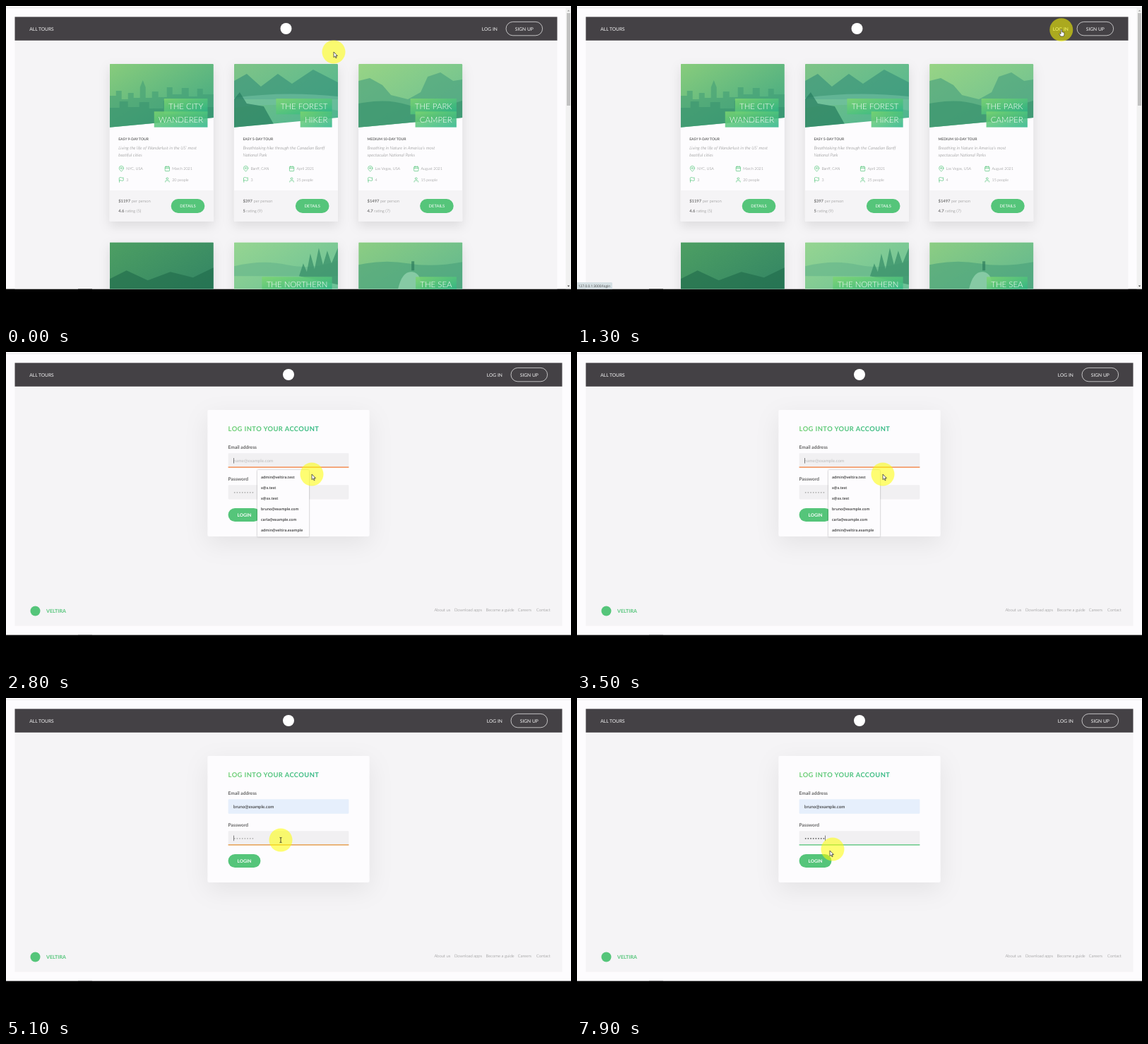
Animation of 800x450 px, one loop 8 s. Source, as an HTML page:

```html
<!DOCTYPE html>
<html lang="en">
<head>
<meta charset="utf-8">
<title>Tour login</title>
<style>
html, body { margin: 0; width: 100%; height: 100%; overflow: hidden; background: #000; }
svg { display: block; width: 800px; height: 450px; font-family: Lato, sans-serif; text-rendering: geometricPrecision; }
text { white-space: pre; }
.card { filter: drop-shadow(0 6px 8px rgba(0,0,0,.1)); }
.form { filter: drop-shadow(0 10px 17px rgba(0,0,0,.07)); }
.menu { filter: drop-shadow(0 .5px 1px rgba(0,0,0,.35)); }
.icon { fill: none; stroke: #55c57a; stroke-width: 2; stroke-linecap: round; stroke-linejoin: round; }
.ui { font-family: "Open Sans", sans-serif; }
</style>
</head>
<body>
<svg viewBox="0 0 800 450">
  <defs>
    <linearGradient id="green"><stop stop-color="#6fd072"/><stop offset="1" stop-color="#2fb784"/></linearGradient>
    <linearGradient id="label" x2="1" y2="1"><stop stop-color="#7dd56f" stop-opacity=".85"/><stop offset="1" stop-color="#28b487" stop-opacity=".85"/></linearGradient>
    <clipPath id="slant"><path d="M0 1.2Q0 0 1.2 0H145.9Q147.1 0 147.1 1.2V76L0 89.8z"/></clipPath>
    <clipPath id="view"><rect width="800" height="400.5"/></clipPath>
  </defs>
  <rect width="800" height="400.5" fill="#fdfcfe"/>
  <rect y="2" width="800" height="1" fill="#e9e8ea"/>
  <g id="home" clip-path="url(#view)"></g>
  <g id="login"></g>
  <g id="status" class="ui">
    <path d="M0 391H48.5Q50 391 50 392.5V400.5H0z" fill="#d6e0e4"/>
    <text x="2" y="397.7" font-size="4.8" fill="#444">127.0.0.1:3000/login</text>
  </g>
  <rect x="102" y="400" width="20" height="1.2" fill="#555"/>
  <circle id="halo" r="16.5" fill="#ff0" opacity=".55"/>
  <g id="pointer"></g>
</svg>
<script>
const $ = id => document.getElementById(id);
const INK = '#777', GREEN = '#55c57a', PAGE = '#f5f4f6', WHITE = '#fdfcfe';

const text = (x, y, size, str, fill = INK, more = '') =>
  `<text x="${x}" y="${y}" font-size="${size}" fill="${fill}" ${more}>${str}</text>`;
const rect = (x, y, w, h, fill, r = 0, more = '') =>
  `<rect x="${x}" y="${y}" width="${w}" height="${h}" rx="${r}" fill="${fill}" ${more}/>`;
const BOLD = 'font-weight="700"', THIN = 'font-weight="300"', MID = 'text-anchor="middle"';

function header(right) {
  return rect(12.5, 15.4, right - 12.5, 33.4, '#444145') +
    text(33.3, 34.6, 6.66, 'ALL TOURS', '#f7f7f7') +
    `<circle cx="${(12.5 + right) / 2}" cy="32" r="8" fill="#fff"/>` +
    text(right - 106.7, 34.6, 6.66, 'LOG IN', '#f7f7f7') +
    rect(right - 72.5, 22.4, 51.6, 19.4, 'none', 9.7, 'stroke="#f7f7f7" stroke-width=".7"') +
    text(right - 46.7, 34.6, 6.66, 'SIGN UP', '#f7f7f7', MID);
}

// ---- tour list ----
const icons = {
  pin: 'M21 10c0 7-9 13-9 13s-9-6-9-13a9 9 0 0 1 18 0zM9 10a3 3 0 1 0 6 0a3 3 0 1 0-6 0',
  date: 'M5 4h14a2 2 0 0 1 2 2v14a2 2 0 0 1-2 2H5a2 2 0 0 1-2-2V6a2 2 0 0 1 2-2zM16 2v4M8 2v4M3 10h18',
  flag: 'M4 15s1-1 4-1 5 2 8 2 4-1 4-1V3s-1 1-4 1-5-2-8-2-4 1-4 1zM4 22v-7',
  user: 'M20 21v-2a4 4 0 0 0-4-4H8a4 4 0 0 0-4 4v2M8 7a4 4 0 1 0 8 0a4 4 0 1 0-8 0'
};
const hills = 'M0 42L22 30 45 38 66 24 92 40 120 22 147 32V92H0z';
const tours = [
  { sky: ['#88cc7c', '#3ba583'], title: ['THE CITY', 'WANDERER'],
    art: [['M0 45h9v-7h8v12h9v-9h8v7h9v-15l4-10 4 10v15h9v-9h9v8h12v-14h8v10h13v-9h10v12h12v-11h8v8h15V92H0z', '#3c9a75', .5],
      ['M0 62h14v-9h12v8h16v-7h14v9h20v-11h14v8h22v-6h16v7h19V92H0z', '#328c6b', .45]],
    level: 'EASY 9-DAY TOUR', lines: ['Living the life of Wanderlust in the US’ most', 'beatiful cities'],
    facts: ['NYC, USA', 'March 2021', '3', '20 people'], price: '$1197', rate: '4.6', votes: 5 },
  { sky: ['#7fc487', '#4bb491'], title: ['THE FOREST', 'HIKER'],
    art: [['M0 24L18 14 38 32 62 14 82 28 112 8 147 26V50H0z', '#38937a', .65],
      ['M0 48Q70 38 147 46V66Q80 52 0 62z', '#73c2a3', .6], ['M0 50L8 40 18 56 42 60 60 92H0z', '#257d5e', .7]],
    level: 'EASY 5-DAY TOUR', lines: ['Breathtaking hike through the Canadian Banff', 'National Park'],
    facts: ['Banff, CAN', 'April 2021', '3', '25 people'], price: '$397', rate: '5', votes: 9 },
  { sky: ['#98d485', '#65bd94'], title: ['THE PARK', 'CAMPER'],
    art: [['M0 24L16 20 34 30 46 44 70 50 88 40 98 18 116 12 134 24 147 22V92H0z', '#4aa27e', .65],
      ['M0 56Q40 48 70 58T147 52V92H0z', '#348f6c', .6]],
    level: 'MEDIUM 10-DAY TOUR', lines: ['Breathing in Nature in America’s most', 'spectacular National Parks'],
    facts: ['Las Vegas, USA', 'August 2021', '4', '15 people'], price: '$1497', rate: '4.7', votes: 7 },
  { sky: ['#4d9f63', '#2e8064'], title: [],
    art: [['M0 52L24 40 54 54 86 42 118 50 147 36V92H0z', '#216c4c', .65]] },
  { sky: ['#96d591', '#63bd98'], title: ['THE NORTHERN'],
    art: [['M0 34Q40 24 75 32T147 26V48H0z', '#65b48a', .6],
      ['M92 48l6-18 5 12 5-26 6 22 6-30 6 24 6-20 6 18 9-22V60z', '#368e67', .7]] },
  { sky: ['#8ccd83', '#58b391'], title: ['THE SEA'],
    art: [['M0 32Q36 24 70 30T147 28V92H0z', '#48a17a', .6],
      ['M56 66Q62 40 76 42T88 66z', '#9bd7b4', .7], ['M75 40v-13h4v13z', '#2d7c5c', .7]] }
];

function card(tour, i) {
  const x = 146.7 + i % 3 * 176.2, y = i < 3 ? 82 : 334.3;
  let out = `<g transform="translate(${x} ${y})">` + rect(0, 0, 147.1, 223, WHITE, 1.3, 'class="card"');
  out += `<linearGradient id="sky${i}" x2="1" y2="1"><stop stop-color="${tour.sky[0]}"/><stop offset="1" stop-color="${tour.sky[1]}"/></linearGradient>`;
  out += `<g clip-path="url(#slant)">` + rect(0, 0, 148, 92, `url(#sky${i})`) +
    tour.art.map(([d, fill, o]) => `<path d="${d}" fill="${fill}" opacity="${o}"/>`).join('') + '</g>';
  tour.title.forEach((line, n) => {
    out += `<g class="title">` + rect(0, 49 + n * 18.3, 10, 22.3, 'url(#label)') +
      text(132.5, 64.2 + n * 18.3, 11.45, line, '#fff', THIN + ' text-anchor="end"') + '</g>';
  });
  if (tour.level) {
    out += text(12.5, 108, 5, tour.level, '#666', BOLD);
    tour.lines.forEach((line, n) => out += text(12.5, 121 + n * 10, 6.25, line, INK, THIN + ' font-style="italic"'));
    Object.values(icons).forEach((d, n) => {
      const fx = 12.5 + n % 2 * 65, fy = 144 + (n >> 1) * 15.8;
      out += `<path class="icon" transform="translate(${fx} ${fy}) scale(.347)" d="${d}"/>` +
        text(fx + 11, fy + 6.1, 5.4, tour.facts[n], INK, THIN);
    });
    const strong = s => `<tspan font-weight="700">${s}</tspan>`;
    out += `<path d="M0 179H147.1V221.7Q147.1 223 145.8 223H1.3Q0 223 0 221.7z" fill="${PAGE}"/>` +
      text(12.5, 196.3, 5.83, strong(tour.price) + ' per person', INK, THIN) +
      text(12.5, 209.7, 5.83, strong(tour.rate) + ` rating (${tour.votes})`, INK, THIN) +
      rect(87, 191, 47.6, 20, GREEN, 10) + text(110.8, 203.1, 5.83, 'DETAILS', '#fff', MID);
  }
  return out + '</g>';
}

$('home').innerHTML = rect(12.5, 48.7, 768, 352, PAGE) + header(780.5) + tours.map(card).join('') +
  rect(792.5, 3, 7.5, 397.5, '#f1f1f1') + rect(794, 10, 5, 131, '#c1c1c1') +
  '<path d="M794.8 7.5h3.4l-1.7-2z" fill="#999"/><path d="M794.8 395.5h3.4l-1.7 2z" fill="#444"/>';

document.querySelectorAll('.title').forEach(g => {
  const [box, label] = g.children, w = label.getComputedTextLength() + 12.5;
  box.setAttribute('x', 138.75 - w);
  box.setAttribute('width', w);
});

// ---- login form ----
const mails = ['admin@veltira.test', 'x@x.test', 'x@xx.test', 'bruno@example.com', 'carla@example.com', 'admin@veltira.example'];
const PICK = 3;
const links = [['About us', 606.4], ['Download apps', 634.9], ['Become a guide', 679.6], ['Careers', 724.8], ['Contact', 751]];

$('login').innerHTML = rect(12.5, 48.7, 775, 338.8, PAGE) + header(787.5) +
  rect(285.4, 82, 229.2, 179, WHITE, 2, 'class="form"') +
  text(314.6, 112.4, 9.37, 'LOG INTO YOUR ACCOUNT', 'url(#green)', BOLD + ' letter-spacing=".416"') +
  text(314.6, 137.3, 6.66, 'Email address', '#666', BOLD) +
  text(314.6, 182, 6.66, 'Password', '#666', BOLD) +
  rect(314.6, 143.3, 170.8, 20.4, '#f1f0f2', 1.3, 'id="mailBox"') +
  rect(314.6, 188.2, 170.8, 20.2, '#f1f0f2', 1.3) +
  text(321.9, 156.2, 6.25, '', INK, 'id="mail"') +
  '<g id="dots"></g>' +
  rect(314.6, 0, 170.8, 1.3, GREEN, 0, 'id="line"') + rect(0, 0, .6, 7.6, '#333', 0, 'id="caret"') +
  rect(314.6, 221, 45.8, 19, GREEN, 9.5) + text(337.5, 232.7, 6.4, 'LOGIN', '#fff', MID + ' font-weight="700"') +
  '<circle cx="41.5" cy="366.5" r="7" fill="#55c57a"/>' + text(57, 369, 7.1, 'VELTIRA', GREEN, BOLD) +
  links.map(([s, x]) => text(x, 366.8, 5.83, s, INK, THIN)).join('') +
  '<g id="menu" class="ui">' + rect(356, 167, 73, 94.6, WHITE, 1, 'class="menu"') +
  rect(356, 169.5, 73, 15, '#e9e8ea', 0, 'id="hover"') +
  mails.map((m, i) => text(361, 179.1 + i * 15, 5.2, m, '#333', 'font-weight="600"')).join('') + '</g>';

// ---- pointer ----
const shapes = {
  arrow: '<path d="M0 0V7.6L1.8 6 3 8.7 4.2 8.2 3 5.5H5.4z" fill="#fff" stroke="#222" stroke-width=".7"/>',
  beam: '<path d="M-1.5-3.6Q0-3.6 0-2.8Q0-3.6 1.5-3.6M0-3V3M-1.5 3.6Q0 3.6 0 2.8Q0 3.6 1.5 3.6" fill="none" stroke="#222" stroke-width=".8"/>',
  hand: '<path d="M-.8 0Q0-.8.8 0V3.2L4 4V7L3.2 9.4H-1.2L-3 6 -2.4 5.2 -.8 6z" fill="#fff" stroke="#222" stroke-width=".6"/>'
};
const path = [[0, 464, 65], [300, 464, 65], [800, 590, 47.5], [1100, 685, 34], [1550, 687, 33], [1700, 644, 42],
  [2300, 372, 154], [2550, 372, 154], [2750, 433, 173], [3500, 433, 173], [4050, 405, 222], [4300, 404, 222],
  [4900, 389, 201], [7650, 389, 201], [7900, 358, 216], [8000, 348, 226]];
const keys = [5500, 5700, 6000, 6500, 6900, 7000, 7400, 7700];

function at(t) {
  const i = Math.max(1, path.findIndex(p => p[0] >= t));
  const [t0, x0, y0] = path[i - 1], [t1, x1, y1] = path[i];
  const k = Math.max(0, (t - t0) / (t1 - t0));
  return [x0 + (x1 - x0) * k, y0 + (y1 - y0) * k];
}
const show = (id, on) => $(id).style.display = on ? '' : 'none';
const set = (id, attrs) => { for (const k in attrs) $(id).setAttribute(k, attrs[k]); };

function draw(t) {
  const [x, y] = at(t), [hx, hy] = at(Math.max(0, t - 32));
  const inLogin = t >= 1500;
  show('home', !inLogin);
  show('login', inLogin);
  show('status', t >= 1100 && t < 1900);

  const open = t >= 2600 && t < 4400, closing = t >= 4300;
  const row = open && x < 429 && y > 169.5 ? Math.floor((y - 169.5) / 15) : -1;
  show('menu', open);
  set('menu', { opacity: closing ? .4 : 1, transform: closing ? 'translate(392.5 217) scale(.97) translate(-392.5 -217)' : '' });
  show('hover', row >= 0);
  set('hover', { y: 169.5 + row * 15 });

  const picked = t >= 4200 ? PICK : row, filled = picked >= 0;
  $('mail').textContent = filled ? mails[picked] : 'name@example.com';
  set('mail', { fill: filled ? '#222' : '#bbb' });
  set('mailBox', { fill: filled ? '#e6effc' : '#f1f0f2' });

  const typed = keys.filter(k => t >= k).length, inPass = t >= 5100;
  $('dots').innerHTML = Array.from({ length: typed || 8 }, (_, i) =>
    `<circle cx="${323.7 + i * 3.67}" cy="198.8" r=".9" fill="${typed ? '#555' : '#aaa'}"/>`).join('');

  show('line', t >= 2500);
  show('caret', t >= 2500);
  const valid = inPass ? typed === 8 : t >= 4200;
  set('line', { y: inPass ? 207.2 : 162.4, fill: valid ? GREEN : inPass ? '#e5953c' : '#f5803e' });
  const caretX = inPass ? 322 + typed * 3.67 : t >= 4200 ? 322.2 + $('mail').getComputedTextLength() : 322;
  set('caret', { x: caretX, y: inPass ? 194.6 : 150 });

  const overField = inLogin && x > 314 && x < 485 && (y > 143 && y < 163.5 || y > 188 && y < 208.4) && !(open && row >= 0);
  const overLink = !inLogin && x > 670 || t >= 1500 && t < 1600;
  $('pointer').innerHTML = shapes[overLink ? 'hand' : overField ? 'beam' : 'arrow'];
  set('pointer', { transform: `translate(${x} ${y})` });
  set('halo', { cx: hx, cy: hy });
}

let start;
function tick(now) {
  start ??= now;
  draw(Math.floor((now - start) % 8000 / 100) * 100);
  requestAnimationFrame(tick);
}
draw(0);
requestAnimationFrame(tick);
</script>
</body>
</html>
```
